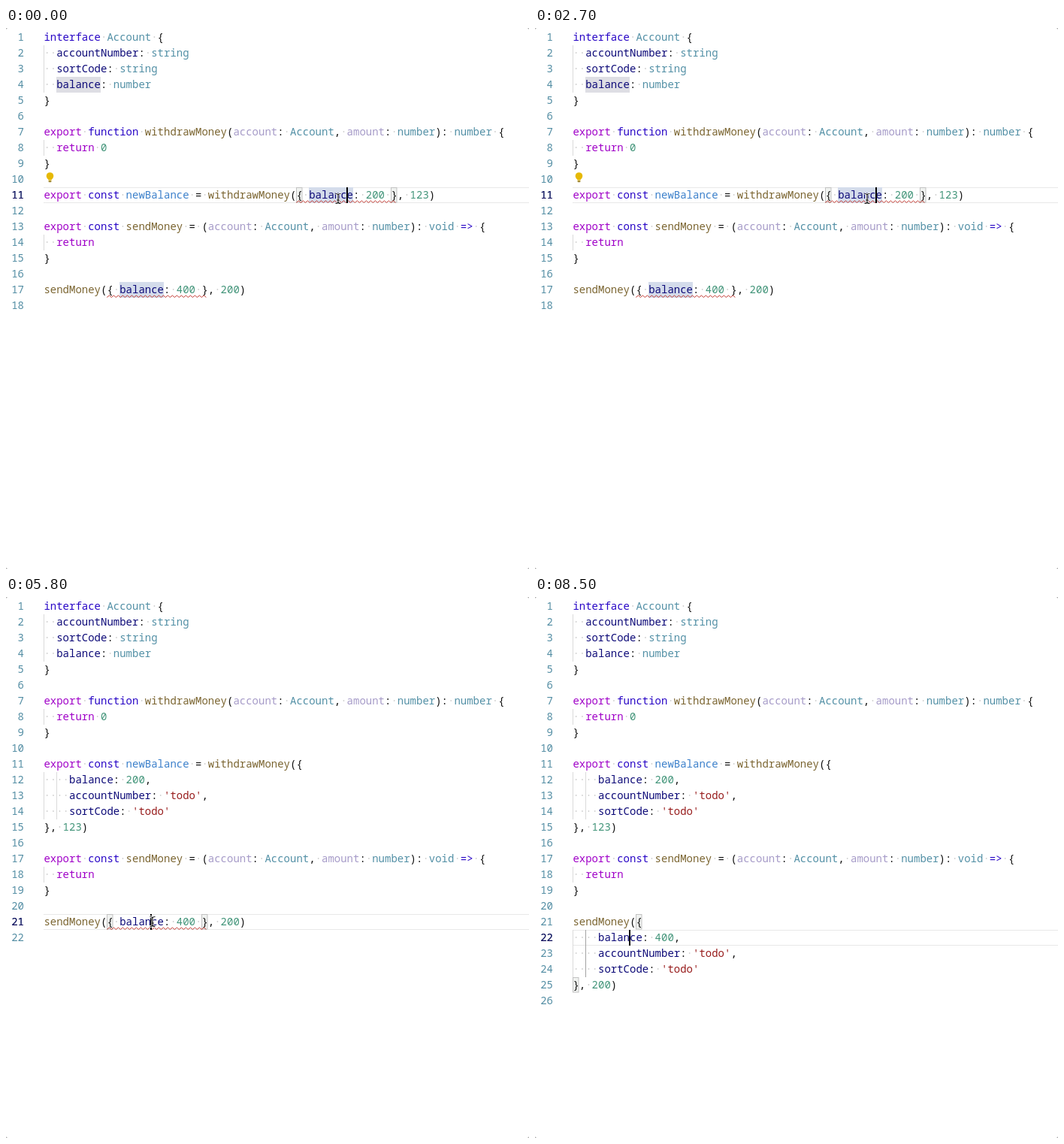
Recreate the animation shown at these times as an HTML page. Size 696 by 720 pixels, loop 8.6 s.

```html
<!DOCTYPE html>
<html lang="en">
<head>
<meta charset="utf-8">
<title>Declare missing members</title>
<style>
  html, body { margin: 0; width: 100%; height: 100%; overflow: hidden; background: #9a9a9a; }
  svg { display: block; width: 696px; height: 720px; background: #fff; border-radius: 3px; }
  text { font: 500 14px "Noto Sans Mono", "DejaVu Sans Mono", monospace; white-space: pre; fill: #111; }
  .ui { font: 12.7px Inter, "Noto Sans", sans-serif; fill: #2b2729; }
  .link { font-size: 12.2px; fill: #3577c4; }
  .keyword { fill: #2806c6; }
  .control { fill: #a000c8; }
  .type { fill: #5390a6; }
  .param { fill: #a69bc8; }
  .func { fill: #7b6531; }
  .constant { fill: #3c80cb; }
  .prop { fill: #0d0a78; }
  .number { fill: #43957a; }
  .string { fill: #981d1d; }
  .dot { fill: #cfcfcf; }
  .gutter { fill: #548ea4; text-anchor: end; }
  .current { fill: #120a5c; }
  .doc { font-weight: 400; fill: #6e6e6e; }
  .faint { font-weight: 400; fill: #a3a3a3; }
  .squiggle { fill: none; stroke: #c23a33; stroke-width: 1; }
  .bracket { fill: #f0f2f0; stroke: #c2c2c2; }
</style>
</head>
<body>
<svg id="stage" viewBox="0 0 696 720"></svg>
<script>
const LOOP = 8600, STEP = 100;
const FIRST_FIX = 3500, CLICK = 5700, SECOND_FIX = 7100;
const stage = document.getElementById('stage');
const parts = [];

const colX = col => 50.4 + col * 8.4;
const rowY = row => 2 + (row - 1) * 21;
const during = (from, to) => t => t >= from && t < to;
const blink = (from, to, phase) => t =>
  t >= from && t < to && (t - phase + LOOP * 10) % 1000 < 500;

function part(markup, visible) {
  const node = document.createElementNS('http://www.w3.org/2000/svg', 'g');
  node.innerHTML = markup;
  stage.append(node);
  parts.push({ node, visible });
  return node;
}

const words = {
  keyword: 'interface function const =>',
  control: 'export return',
  type: 'Account string number void',
  param: 'account amount',
  func: 'withdrawMoney sendMoney',
  constant: 'newBalance',
  prop: 'accountNumber sortCode balance',
};
const kinds = new Map(Object.entries(words).flatMap(
  ([kind, list]) => list.split(' ').map(word => [word, kind])));

function kindOf(token) {
  if (token === ' ') return 'dot';
  if (token[0] === "'") return 'string';
  if (/^\d/.test(token)) return 'number';
  return kinds.get(token) || 'plain';
}

const text = (x, y, cls, content) =>
  `<text x="${x}" y="${y}" class="${cls}">${content.replace(/>/g, '&gt;')}</text>`;
const rect = (x, y, w, h, attrs) =>
  `<rect x="${x}" y="${y}" width="${w}" height="${h}" ${attrs}/>`;

function codeLine(line, i) {
  const row = i + 1, y = rowY(row);
  let out = text(24, y + 15, 'gutter', String(row));
  const indent = line.search(/\S|$/);
  for (let col = 0; col < indent; col += 2)
    out += rect(Math.round(colX(col)), y, 1, 21, 'fill="#dadada"');
  for (const { 0: token, index } of line.matchAll(/'\w+'|\w+|=>|./g))
    out += text(colX(index), y + 15, kindOf(token), token === ' ' ? '·' : token);
  return out;
}

function call(prefix, balance, amount, fixed) {
  return fixed
    ? `${prefix}({
    balance: ${balance},
    accountNumber: 'todo',
    sortCode: 'todo'
}, ${amount})`
    : `${prefix}({ balance: ${balance} }, ${amount})`;
}

const code = (firstFixed, secondFixed) => `interface Account {
  accountNumber: string
  sortCode: string
  balance: number
}

export function withdrawMoney(account: Account, amount: number): number {
  return 0
}

${call('export const newBalance = withdrawMoney', 200, 123, firstFixed)}

export const sendMoney = (account: Account, amount: number): void => {
  return
}

${call('sendMoney', 400, 200, secondFixed)}
`.split('\n').map(codeLine).join('');

const highlight = (row, col, color) =>
  rect(Math.round(colX(col)), rowY(row), 59, 21, `fill="${color}"`);
const readMark = highlight(4, 2, '#dedee4');
const writeMark = (row, col) => highlight(row, col, '#d4dceb');
const bracket = (row, col) =>
  rect(Math.round(colX(col)) + .5, rowY(row) + .5, 7.5, 19.5, 'class="bracket"');
const currentLine = row =>
  rect(50, rowY(row), 646, 1, 'fill="#e8e8e8"') +
  rect(50, rowY(row) + 20, 646, 1, 'fill="#e8e8e8"');
const currentNumber = row => text(24, rowY(row) + 15, 'gutter current', String(row));
const activeGuide = row => rect(67, rowY(row), 1, 63, 'fill="#a2a2a2"');
const caret = (row, col) => rect(Math.round(colX(col)) - 1, rowY(row), 2, 21, 'fill="#000"');

function squiggle(row, from, to) {
  const y = rowY(row) + 20.5;
  let path = `M${colX(from)} ${y}`;
  for (let x = colX(from) + 3, up = true; x <= colX(to); x += 3, up = !up)
    path += `L${x} ${up ? y - 2.6 : y}`;
  return `<path class="squiggle" d="${path}"/>`;
}

function bulb(row) {
  const y = rowY(row);
  return `<circle cx="58.5" cy="${y + 6}" r="4.8" fill="#e6b905"/>` +
    rect(56.3, y + 9, 4.4, 2.6, 'fill="#e6b905"') +
    rect(56.5, y + 12, 4, 2.2, 'rx="1" fill="#a48a35"');
}

function popup() {
  const body = [
    "Argument of type '{ balance: number; }' is not assignable",
    "to parameter of type 'Account'.",
    "  Type '{ balance: number; }' is missing the following",
    "properties from type 'Account': accountNumber,",
    'sortCode',
  ];
  return rect(212.5, 46.5, 500, 167, 'fill="#f4f4f4" stroke="#c9c9c9"') +
    rect(213, 76, 490, 1, 'fill="#d2d2d2"') +
    rect(213, 190, 490, 23, 'fill="#e9e9e9"') +
    rect(213, 190, 490, 1, 'fill="#dcdcdc"') +
    text(221, 66, 'prop', '(property) Account.balance: number') +
    body.map((line, i) => text(221, 96 + i * 21, 'doc', line)).join('') +
    text(294, 180, 'faint', 'ts(2345)') +
    text(221, 206, 'ui link', 'View Problem (⌥F8)') +
    text(353, 206, 'ui link', 'Quick Fix... (^Enter)');
}

function menu(row, col) {
  const x = Math.round(colX(col)), y = rowY(row) + 15;
  return rect(x - 7, y - 1, 267, 78, 'rx="12" fill="#000" opacity=".04"') +
    rect(x - 3, y - 1, 259, 73, 'rx="9" fill="#000" opacity=".04"') +
    rect(x + .5, y + .5, 252, 66, 'rx="6" fill="#eee8e9" stroke="#cbc6c7"') +
    text(x + 15, y + 22, 'ui', 'Declare missing members') +
    rect(x + 15, y + 33, 222, 1, 'fill="#d3cdce"') +
    text(x + 15, y + 55, 'ui', 'Learn more about JS/TS refactorings');
}

const beforeFix = during(0, FIRST_FIX);
const between = during(FIRST_FIX, CLICK);
const clicked = during(CLICK, SECOND_FIX);
const afterFix = during(SECOND_FIX, LOOP);
const menuOpen = t => during(3200, FIRST_FIX)(t) || during(6500, SECOND_FIX)(t);

// Backgrounds below the text
part(currentLine(11) + readMark + writeMark(11, 42) + writeMark(17, 12) +
  bracket(11, 40) + bracket(11, 55), beforeFix);
part(currentLine(12) + bracket(11, 40) + bracket(15, 0), between);
part(currentLine(21) + bracket(21, 10) + bracket(21, 25), clicked);
part(readMark + writeMark(12, 4) + writeMark(21, 12), during(6000, SECOND_FIX));
part(currentLine(22) + bracket(21, 10) + bracket(25, 0), afterFix);

// Code
part(code(false, false) + currentNumber(11) + squiggle(11, 40, 56) +
  squiggle(17, 10, 26) + bulb(10), beforeFix);
part(code(true, false) + squiggle(21, 10, 26), during(FIRST_FIX, SECOND_FIX));
part(code(true, true) + currentNumber(22) + activeGuide(22), afterFix);
part(currentNumber(12) + activeGuide(12), between);
part(currentNumber(21), clicked);
part(bulb(20), during(6200, SECOND_FIX));

part(caret(11, 48), blink(0, 3200, 600));
part(caret(12, 10), blink(FIRST_FIX, CLICK, 3400));
part(caret(21, 17), blink(CLICK, 6500, CLICK));
part(caret(22, 9), blink(SECOND_FIX, LOOP, SECOND_FIX));

part(popup(), during(500, 2500));
part(menu(11, 40), during(3200, FIRST_FIX));
part(menu(21, 10), during(6500, SECOND_FIX));

const beamPath = 'M-3.5-6.5Q-.5-6.5 0-5Q.5-6.5 3.5-6.5M0-5V5M-3.5 6.5Q-.5 6.5 0 5Q.5 6.5 3.5 6.5M-1.8 2H1.8';
const beam = part(
  `<path d="${beamPath}" fill="none" stroke="#fff" stroke-width="2.8"/>
   <path d="${beamPath}" fill="none" stroke="#111" stroke-width="1.2"/>`,
  t => t < 7900 && !menuOpen(t));
const arrow = part(
  '<path d="M0-1V13.5L3.3 10.5L5.6 15.8L8.2 14.7L5.9 9.6H10.3Z" fill="#000" stroke="#fff"/>',
  menuOpen);

const mousePath = [
  [0, 442, 227], [3600, 442, 227], [4300, 197, 435], [5400, 197, 435],
  [5600, 195, 432], [7200, 195, 432], [7900, 235, 735], [LOOP, 235, 735],
];

function mouseAt(t) {
  const i = mousePath.findIndex(([time]) => time > t);
  const [t0, x0, y0] = mousePath[i - 1], [t1, x1, y1] = mousePath[i];
  const p = (t - t0) / (t1 - t0), ease = p * p * (3 - 2 * p);
  return `translate(${x0 + (x1 - x0) * ease} ${y0 + (y1 - y0) * ease})`;
}

function draw(now) {
  const elapsed = Math.max(0, now - start) % LOOP;
  const t = Math.floor(elapsed / STEP) * STEP;
  for (const { node, visible } of parts)
    node.style.display = visible(t) ? '' : 'none';
  const place = mouseAt(t);
  beam.setAttribute('transform', place);
  arrow.setAttribute('transform', place);
  requestAnimationFrame(draw);
}

const start = performance.now();
draw(start);
</script>
</body>
</html>
```
